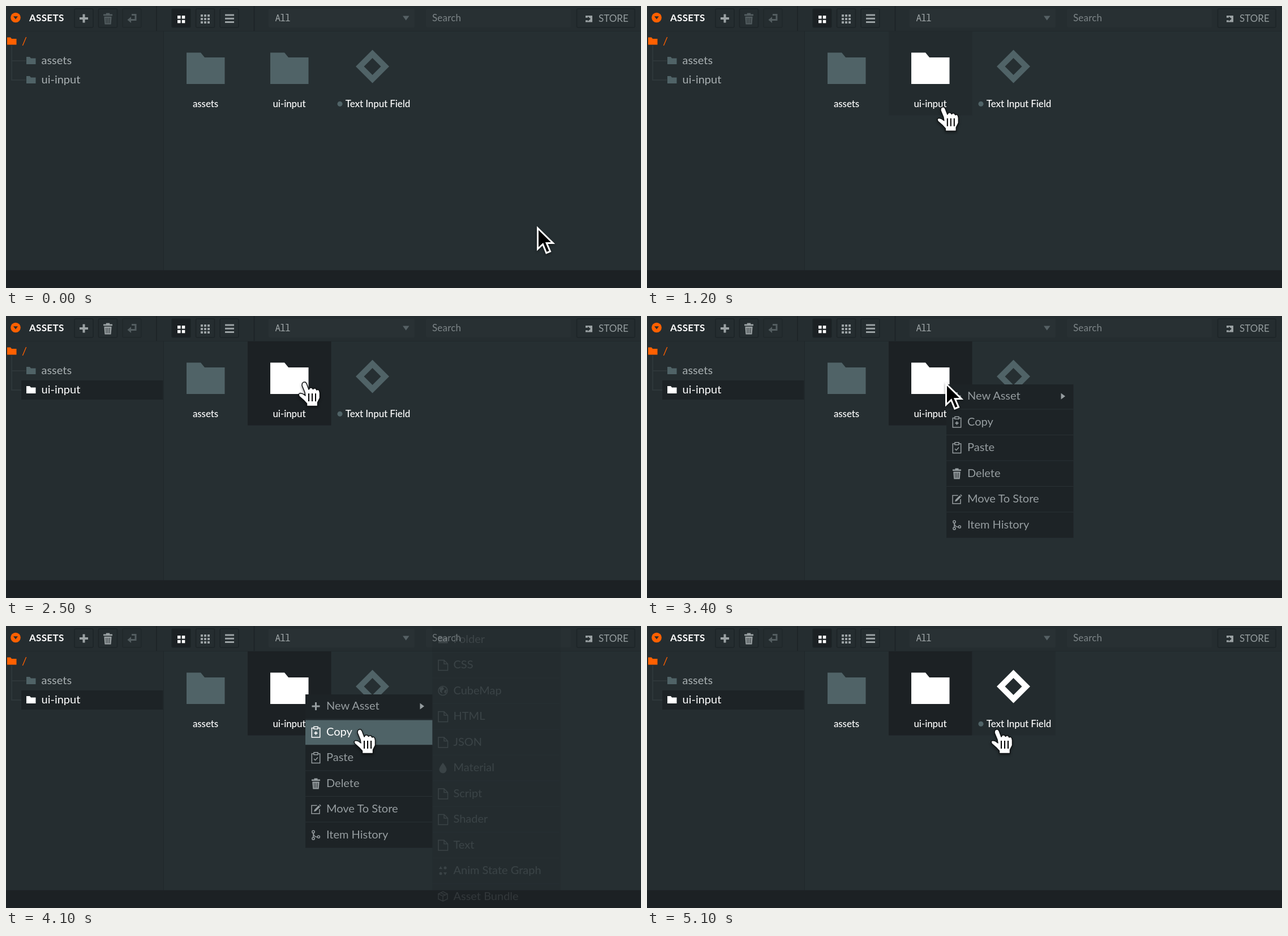
Write an HTML page that moves like this. It is 1122 px wide and 499 px high and loops after 6 s.

```html
<!DOCTYPE html>
<html lang="en">
<head>
<meta charset="utf-8">
<title>Asset browser</title>
<style>
html, body { margin: 0; width: 100%; height: 100%; overflow: hidden; background: #262f32; }
svg { display: block; width: 100vw; height: 100vh; }
text { font: 400 20px Lato, "Open Sans", sans-serif; fill: #a9b0b2; white-space: pre; }
.small { font-size: 17px; }
.name { font-size: 17px; font-weight: 500; fill: #fff; text-anchor: middle; letter-spacing: -.1px; }
.title { font-size: 17px; font-weight: 700; fill: #fff; letter-spacing: .3px; }
.mono { font: 16px "Noto Sans Mono", "DejaVu Sans Mono", monospace; letter-spacing: -.9px; fill: #a1a8aa; }
.btn { fill: #252d30; stroke: #1d2427; stroke-width: 1.5; }
.asset { fill: #506367; }
.line { fill: none; stroke: currentColor; stroke-width: 1.5; }
.solid { fill: currentColor; }
.item { color: #969da0; }
.item text { fill: currentColor; }
.item.on { color: #fff; }
.lit, .lit text { fill: #fff; }
#trash { color: #535d60; }
#trash.on { color: #9ba2a4; }
#pointer { filter: drop-shadow(0 2px 2px rgba(0,0,0,.45)); }
</style>
</head>
<body>
<svg viewBox="0 0 1122 499" preserveAspectRatio="none">
  <defs>
    <path id="folder" d="M0 0H25L32 8.500H67.500V55.500H0Z"/>
    <path id="mini" d="M0 0H6L8 2.500H16.500V13H0Z"/>
    <g id="i-plus"><path class="line" style="stroke-width:3" d="M-7 0H7M0-7V7"/></g>
    <g id="i-clip">
      <path class="line" d="M-3.500-7H-7.200V9.500H7.200V-7H3.500"/>
      <path class="line" d="M-3.500-9.300H3.500V-5.300H-3.500Z"/>
    </g>
    <g id="i-copy"><use href="#i-clip"/><path class="line" style="stroke-width:1.800" d="M-3 2H3M0-1V5"/></g>
    <g id="i-paste"><use href="#i-clip"/><path class="line" d="M-3.500 2L-1 4.500L3.500-.5"/></g>
    <g id="i-trash">
      <path class="solid" fill-rule="evenodd" d="M-7.500-7H-3V-9H3V-7H7.500V-4.500H-7.500ZM-6.200-3H6.200L5.200 10H-5.200ZM-3.500-1L-3.200 8H-2.200L-2.500-1ZM-.5-1V8H.5V-1ZM2.500-1L2.200 8H3.200L3.500-1Z"/>
    </g>
    <g id="i-move">
      <path class="line" d="M2-6.500H-7.500V8H6.500V0"/>
      <path class="solid" d="M-3.500 4.500L-2.500 1L5-6.500L7.500-4L0 3.500ZM5.800-7.300L7-8.500L9.300-6L8.200-4.800Z"/>
    </g>
    <g id="i-history">
      <path class="line" d="M-4.500-3V4.500M-4.500-3Q-4 3.500 2.500 4"/>
      <circle class="line" cx="-4.500" cy="-5.300" r="2.100"/>
      <circle class="line" cx="-4.500" cy="6.500" r="2.100"/>
      <circle class="line" cx="4.800" cy="3.500" r="2.100"/>
    </g>
    <g id="i-folder"><use href="#mini" class="solid" x="-8" y="-6"/></g>
    <g id="i-file"><path class="line" d="M-8-8.500H2L8.500-2V9.500H-8ZM2-8.500V-2H8.500"/></g>
    <g id="i-globe">
      <circle class="line" r="8"/>
      <path class="solid" d="M-6-5L0-7L2-3L-2 0L-1 5L-5 2ZM3-1L7-2L5 5L2 3Z"/>
    </g>
    <g id="i-drop"><path class="solid" d="M0-9Q6.500-1 6.500 3A6.500 6.500 0 0 1-6.500 3Q-6.500-1 0-9Z"/></g>
    <g id="i-graph">
      <path class="solid" d="M-4-8L-1-3H-7ZM4 8L1 3H7Z"/>
      <circle class="solid" cx="-4" cy="5" r="2.500"/><circle class="solid" cx="4" cy="-5" r="2.500"/>
    </g>
    <g id="i-box"><path class="line" d="M0-8.500L8-4.500V4.500L0 8.500L-8 4.500V-4.500ZM-8-4.500L0-.5L8-4.500M0-.5V8.500M-4-6.500L4-2.500"/></g>
  </defs>

  <rect width="1122" height="499" fill="#262f32"/>
  <rect width="278" height="468" fill="#252d30"/>
  <rect width="1122" height="44" fill="#252d30"/>
  <path d="M0 44.500H1122M278.500 45V468" stroke="#20282b"/>
  <path d="M266 0V44M438.500 0V44" stroke="#1c2326" stroke-width="1.500"/>
  <rect y="467.500" width="1122" height="31.500" fill="#1c2124"/>

  <!-- toolbar -->
  <circle cx="17" cy="20.500" r="8.800" fill="#ff6000"/>
  <path d="M13 18.200H21L17 23.500Z" fill="#252d30"/>
  <text class="title" x="41" y="26.500">ASSETS</text>
  <g id="buttons"></g>
  <path d="M137.500 14.500V29.500M130 22H145" stroke="#9ba2a4" stroke-width="4"/>
  <g id="trash"><use href="#i-trash" transform="translate(180 22) scale(1.060)"/></g>
  <path d="M222 15.500H229V24.500H219" fill="none" stroke="#535d60" stroke-width="3"/>
  <path d="M214.500 24.500L221 19V30Z" fill="#535d60"/>
  <g id="cells"></g>
  <path d="M387 16H403M387 22.200H403M387 28.400H403" stroke="#9ba2a4" stroke-width="3"/>
  <rect x="464" y="5" width="258" height="33" rx="2" fill="#293134"/>
  <text class="mono" x="475.500" y="27">All</text>
  <path d="M701 17.500H712.500L706.700 25.500Z" fill="#566165"/>
  <rect x="742" y="5" width="256" height="33" rx="2" fill="#283033"/>
  <text class="small" x="753" y="27" style="fill:#7d8588;letter-spacing:.2px">Search</text>
  <path d="M1024 17H1036V28.500H1024V25.200H1028V27L1033 22.700L1028 18.500V20.800H1024Z" fill="#9ba2a4"/>
  <text class="small" x="1047" y="28" style="fill:#959d9f">STORE</text>

  <!-- folder tree -->
  <path d="M10 70V131H35M10 97H35" fill="none" stroke="#2e373a" stroke-width="2"/>
  <rect id="row" x="27" y="114" width="250.500" height="34" fill="#1d2326"/>
  <use href="#mini" x="2" y="55.500" fill="#ff6000"/>
  <text x="28" y="68.500" style="fill:#ff6000">/</text>
  <use href="#mini" class="asset" x="36" y="90"/>
  <text x="62.500" y="103">assets</text>
  <g id="branch">
    <use href="#mini" x="36" y="124" id="branchIcon"/>
    <text x="62.500" y="137">ui-input</text>
  </g>

  <!-- tiles -->
  <rect id="tile" x="427" y="45" width="147.500" height="148.500"/>
  <rect id="tile3" x="575" y="45" width="147" height="148.500" fill="#232b2e"/>
  <use href="#folder" class="asset" x="319" y="82.500"/>
  <use href="#folder" id="bigFolder" x="467" y="82.500"/>
  <path id="diamond" fill-rule="evenodd" d="M647.500 77.500L677 107L647.500 136.500L618 107ZM647.500 92L632.500 107L647.500 122L662.500 107Z"/>
  <circle class="asset" cx="590" cy="173.300" r="4.500"/>
  <text class="name" x="352.500" y="178.500">assets</text>
  <text class="name" x="500.500" y="178.500">ui-input</text>
  <text class="name" x="657" y="178.500">Text Input Field</text>

  <g id="menu">
    <rect x="529" y="121" width="224.500" height="271.500" fill="#1d2326"/>
    <rect id="hover" x="529" width="224.500" height="44.500" fill="#4f6367"/>
    <g id="items"></g>
    <path d="M731.500 136.500V147.500L739 142Z" fill="#969da0"/>
  </g>
  <g id="submenu">
    <rect x="753" width="227" height="499" fill="#1d2326"/>
    <g id="subitems"></g>
  </g>

  <g id="ring" fill="none">
    <circle r="86.200" stroke="#15191b" stroke-width="3"/>
    <circle r="87.500" stroke="#c9cccd" stroke-width="1.300"/>
    <circle r="84.800" stroke="#a4a9ab" stroke-width="1"/>
  </g>
  <g id="pointer">
    <path id="arrow" d="M1.500 4V41L10.500 32.500L16.800 48L23.500 45.200L17.200 30.500H28.500Z" fill="#000" stroke="#fff" stroke-width="3"/>
    <g id="hand" transform="translate(-11 0)">
      <path d="M7.500 3L10 1H13L15 3.500L19 14L21 11H24.500L26.500 13.500L28.500 12H31L33 15L35 14L37.500 16L38.500 20V29L34.500 37V43.500H15.500V39L10 33L2 26L1 22.500L3.500 20.500L8 21.500L13 25L12 19L7 7Z"
        fill="#fff" stroke="#101314" stroke-width="1.500" stroke-linejoin="round"/>
      <path d="M19 21V35M25 21V35M31 21V35" stroke="#000" stroke-width="2"/>
    </g>
  </g>
</svg>
<script>
const $ = id => document.getElementById(id);
const show = (id, on) => $(id).setAttribute("display", on ? "inline" : "none");
const PITCH = 45.5;

function fillMenu(id, x, y, labels, icons) {
  $(id).innerHTML = labels.map((label, i) => {
    const cy = y + i * PITCH;
    const rule = i ? `<path d="M${x} ${cy - 22.5}h224.5" stroke="#293134"/>` : "";
    return `<g class="item">${rule}<use href="#i-${icons[i]}" x="${x + 18.5}" y="${cy}"/>` +
      `<text x="${x + 37}" y="${cy + 6}">${label}</text></g>`;
  }).join("");
}

fillMenu("items", 529, 142,
  ["New Asset", "Copy", "Paste", "Delete", "Move To Store", "Item History"],
  ["plus", "copy", "paste", "trash", "move", "history"]);
fillMenu("subitems", 753.5, 23.5,
  ["Folder", "CSS", "CubeMap", "HTML", "JSON", "Material", "Script", "Shader", "Text", "Anim State Graph", "Asset Bundle"],
  ["folder", "file", "globe", "file", "file", "drop", "file", "file", "file", "graph", "box"]);

$("buttons").innerHTML = [121, 163.5, 206, 293, 335.5, 378, 1008.5].map((x, i) =>
  `<rect class="btn" x="${x}" y="5" width="${i < 6 ? 33 : 102.5}" height="33" rx="2" ` +
  `${i === 3 ? 'style="fill:#1b2023"' : i === 2 ? 'opacity=".6"' : ""}/>`).join("");

function cells(x, y, count, size, step, color) {
  let out = "";
  for (let k = 0; k < count * count; k++)
    out += `<rect x="${x + k % count * step}" y="${y + Math.floor(k / count) * step}" width="${size}" height="${size}" fill="${color}"/>`;
  return out;
}
$("cells").innerHTML = cells(303, 17, 2, 5.5, 7.8, "#fff") + cells(344, 15, 3, 4, 6, "#9ba2a4");

// pointer stops: tick of 100 ms, x, y
const stops = [
  [1, 938, 389], [8, 482, 262], [9, 482, 262], [14, 545, 132], [22, 545, 132],
  [25, 527, 116], [38, 527, 116], [41, 625, 182], [44, 637, 193], [49, 637, 193], [51, 618, 182]
];
const clicks = [[23, 528, 119], [32, 528, 119], [49, 620, 182]];
const fade = { 39: .06, 40: .26, 41: .18, 42: .08 };

function pointerAt(n) {
  if (n <= stops[0][0]) return stops[0].slice(1);
  const i = stops.findIndex(s => s[0] >= n);
  if (i < 0) return stops[stops.length - 1].slice(1);
  const [t0, x0, y0] = stops[i - 1], [t1, x1, y1] = stops[i];
  const u = (n - t0) / (t1 - t0), e = u * u * (3 - 2 * u);
  return [x0 + (x1 - x0) * e, y0 + (y1 - y0) * e];
}

function draw(ms) {
  const n = Math.floor(ms % 6000 / 100);
  const [x, y] = pointerAt(n);
  const selected = n >= 23;
  const menu = n >= 33 && n < 50;
  const hand = n >= 39 || (n < 33 && y < 193);
  const over = hand && n < 33;
  const last = n >= 50;

  show("row", selected);
  $("branch").setAttribute("class", selected ? "lit" : "");
  $("branchIcon").setAttribute("class", selected ? "" : "asset");
  $("trash").setAttribute("class", selected ? "on" : "");
  show("tile", selected || over);
  $("tile").setAttribute("fill", selected ? "#1c2124" : "#232b2e");
  $("bigFolder").setAttribute("class", selected || over ? "lit" : "asset");
  show("tile3", last);
  $("diamond").setAttribute("class", last ? "lit" : "asset");

  show("menu", menu);
  const row = menu && n >= 39 ? (y < 165 ? 0 : 1) : -1;
  show("hover", row >= 0);
  $("hover").setAttribute("y", 121 + Math.max(row, 0) * PITCH);
  [...$("items").children].forEach((g, i) => g.classList.toggle("on", i === row));
  $("submenu").setAttribute("opacity", fade[n] || 0);

  const click = clicks.find(c => n === c[0] || n === c[0] + 1);
  show("ring", click);
  if (click) {
    $("ring").setAttribute("transform", `translate(${click[1]} ${click[2]})`);
    $("ring").setAttribute("opacity", n === click[0] ? 1 : .4);
  }
  show("hand", hand);
  show("arrow", !hand);
  $("pointer").setAttribute("transform", `translate(${x} ${y})`);
}

const start = performance.now();
function loop(now) {
  draw(Math.max(0, now - start));
  requestAnimationFrame(loop);
}
draw(0);
requestAnimationFrame(loop);
</script>
</body>
</html>
```
